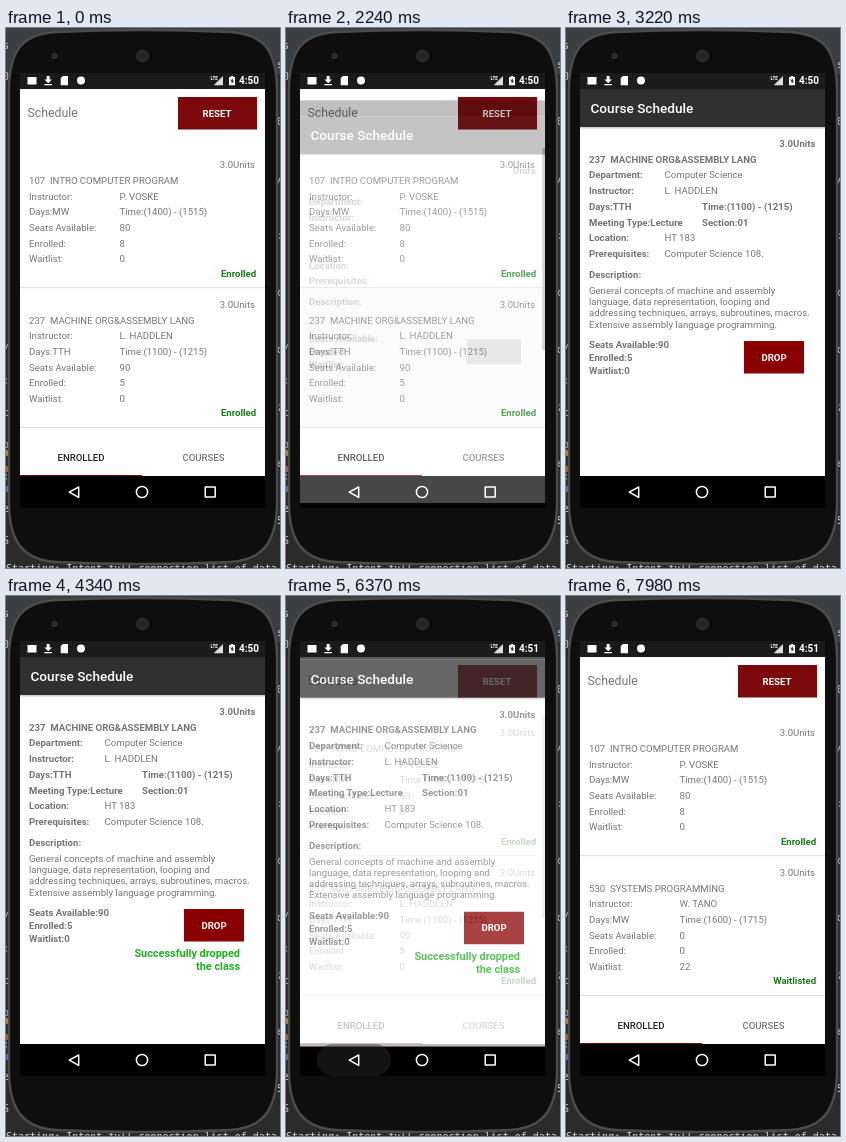
An HTML page that plays this animation: 274x540 px, repeating every 8.19 s.

```html
<!DOCTYPE html>
<html lang="en">
<head>
<meta charset="utf-8">
<title>Course schedule</title>
<style>
  html, body { margin: 0; width: 100%; height: 100%; overflow: hidden; background: #2b2b2b; }
  svg { display: block; width: 274px; height: 540px; }
  text { font: 9.6px Roboto, sans-serif; fill: #757575; white-space: pre; }
  .bold { font-weight: 700; }
  .medium { font-weight: 500; }
  .end { text-anchor: end; }
  .mid { text-anchor: middle; }
  .white { fill: #fff; }
  .dark { fill: #212121; }
  .green { fill: #1a7a1a; }
  .title { font-size: 13.6px; }
  .heading { font-size: 12.3px; }
  .notice { font-size: 10.9px; fill: #20ae20; }
  .code { font: 10px "DejaVu Sans Mono", monospace; fill: #d0d4d8; }
</style>
</head>
<body>
<svg id="stage" viewBox="0 0 274 540"></svg>
<script>
const LOOP = 8190, STEP = 70;

const text = (x, y, str, cls = '') =>
  `<text x="${x}" y="${y}" class="${cls}">${str.replace(/&/g, '&amp;')}</text>`;
const rect = (x, y, w, h, fill, more = '') =>
  `<rect x="${x}" y="${y}" width="${w}" height="${h}" fill="${fill}" ${more}/>`;

function courseRow(y, c) {
  const pairs = [['Instructor:', c.teacher], ['Days:' + c.days, 'Time:' + c.time],
    ['Seats Available:', c.seats], ['Enrolled:', c.enrolled], ['Waitlist:', c.waiting]];
  return text(249, y + 20.4, '3.0Units', 'end') + text(23, y + 36.2, c.name) +
    pairs.map(([a, b], i) => text(23, y + 51.8 + i * 15.6, a) + text(113.5, y + 51.8 + i * 15.6, b)).join('') +
    text(250.2, y + 128.6, c.status, 'end bold green');
}

const intro = { name: '107  INTRO COMPUTER PROGRAM', teacher: 'P. VOSKE', days: 'MW',
  time: '(1400) - (1515)', seats: '80', enrolled: '8', waiting: '0', status: 'Enrolled' };
const machine = { name: '237  MACHINE ORG&ASSEMBLY LANG', teacher: 'L. HADDLEN', days: 'TTH',
  time: '(1100) - (1215)', seats: '90', enrolled: '5', waiting: '0', status: 'Enrolled' };
const systems = { name: '530  SYSTEMS PROGRAMMING', teacher: 'W. TANO', days: 'MW',
  time: '(1600) - (1715)', seats: '0', enrolled: '0', waiting: '22', status: 'Waitlisted' };

// Code lines of the editor peek out on both sides of the phone.
const peeks = [...'s0/:co;eS'].map((ch, i) =>
  text(-3, i < 2 ? 21 + i * 31 : 260 + i * 32, ch, 'code') + text(271, 40 + i * 57, ch, 'code')).join('');

const backdrop = rect(0, 0, 274, 540, '#2b2b2b') + rect(0, 0, 274, 46, '#3c3f41') + peeks +
  '<circle cx="1" cy="425" r="3" fill="#b98a35"/><circle cx="1" cy="441" r="3" fill="#b0602f"/>' +
  '<circle cx="1" cy="461" r="3" fill="#5d6fae"/>' +
  text(0, 544, 'Starting: Intent full connection list of data', 'code');

const phone = `<path d="M3 60C4 20 18 6 50 4Q137 0 224 4C256 6 270 20 271 60V478
    C270 515 256 532 224 534Q137 538 50 534C18 532 4 515 3 478Z"
    fill="#0e0e0e" stroke="#4c4c4c" stroke-width="2.4"/>` +
  '<circle cx="136.5" cy="28" r="6" fill="#262626" stroke="#333"/>' +
  '<circle cx="48.5" cy="28" r="2.6" fill="#2a2a2a" stroke="#444" stroke-width=".8"/>';

const listPage = rect(14, 45, 245, 16, '#1a1a1a') + rect(14, 61, 245, 387, '#fff') +
  text(21.5, 89.3, 'Schedule', 'heading') +
  rect(172, 69, 79, 32.5, '#7b080b') + text(211, 88.8, 'RESET', 'mid bold white') +
  rect(14, 260, 245, 140, '#000', 'id="press" opacity="0"') +
  courseRow(120, intro) +
  `<g id="oldRow">${courseRow(259.6, machine)}</g><g id="newRow">${courseRow(259.6, systems)}</g>` +
  rect(14, 259.3, 245, .8, '#d6d6d6') + rect(14, 399, 245, .8, '#d6d6d6') +
  rect(256.3, 120, 2.7, 202, '#c2c2c2', 'id="scrollbar"') +
  text(75, 432.6, 'ENROLLED', 'mid medium dark') + text(197.5, 432.6, 'COURSES', 'mid medium') +
  rect(14, 447, 122, 1, '#7b080b') +
  `<g clip-path="url(#content)"><g id="spinner">
    <circle r="14.3" cy=".8" fill="#000" opacity=".14"/><circle r="13.6" fill="#fafafa"/>
    <circle id="arc" r="5.5" fill="none" stroke="#222" stroke-width="1.7"/></g></g>`;

const facts = [['Department:', 'Computer Science', 98.5, ''], ['Instructor:', machine.teacher, 98.5, ''],
  ['Days:TTH', 'Time:(1100) - (1215)', 136, 'bold'], ['Meeting Type:Lecture', 'Section:01', 136, 'bold'],
  ['Location:', 'HT 183', 98.5, ''], ['Prerequisites:', 'Computer Science 108.', 98.5, '']];
const about = ['General concepts of machine and assembly', 'language, data representation, looping and',
  'addressing techniques, arrays, subroutines, macros.', 'Extensive assembly language programming.'];
const totals = [['Seats Available:', '90'], ['Enrolled:', '5'], ['Waitlist:', '0']];

const factLine = i => 150.2 + i * 15.8;
const totalLines = (y, filled) =>
  totals.map(([label, n], i) => text(23, y + i * 13, label + (filled ? n : ''), 'bold')).join('');

const emptyDetail = text(249.5, 118.8, 'Units', 'end bold') +
  facts.map(([a], i) => a.endsWith(':') ? text(23, factLine(i), a, 'bold') : '').join('') +
  totalLines(286.5, false) + rect(181, 284, 54, 25, '#bcbcbc');

const filledDetail = text(249.5, 118.8, '3.0Units', 'end bold') + text(23, 134.6, machine.name, 'bold') +
  facts.map(([a, b, x, cls], i) => text(23, factLine(i), a, 'bold') + text(x, factLine(i), b, cls)).join('') +
  about.map((line, i) => text(23, 266 + i * 11.2, line)).join('') + totalLines(320, true) +
  rect(178, 313, 60, 32.5, '#8a0000') + rect(178, 313, 60, 32.5, '#fff', 'id="dropPress" opacity="0"') +
  text(208, 332.7, 'DROP', 'mid bold white') +
  `<g id="notice">${text(234, 361.3, 'Successfully dropped', 'end bold notice')}
    ${text(234, 374.2, 'the class', 'end bold notice')}</g>`;

const detailPage = rect(14, 45, 245, 16, '#1c1c1c') + rect(14, 99, 245, 349, '#fff') +
  rect(14, 99, 245, 1.5, '#000', 'opacity=".18"') + rect(14, 61, 245, 38, '#303030') +
  rect(14, 448, 245, 32, '#000') + text(24.5, 85, 'Course Schedule', 'title medium white') +
  text(23, 250, 'Description:', 'bold') +
  `<g id="empty">${emptyDetail}</g><g id="filled">${filledDetail}</g>`;

const statusIcons = rect(21.5, 49, 9, 7.5, '#fff') +
  '<path d="M40.7 48h3v3.5h2.3L42.2 55.3 38.4 51.5h2.3zM38.4 56h7.6v1.2h-7.6z" fill="#fff"/>' +
  '<path d="M57 48h5v9.3h-7.3V50.3z" fill="#fff"/>' +
  '<circle cx="75" cy="52.6" r="4" fill="#fff"/>' +
  '<path d="M217 48v9.3h-9.3z" fill="#ddd"/>' +
  '<text x="204.5" y="52" class="bold white" style="font-size:4.6px">LTE</text>' +
  '<path d="M223 49h1.8v-1h2.4v1H229v8.3h-6z" fill="#fff"/>' +
  '<path d="M226.6 50l-2.2 3.5h1.4v2.6l2.1-3.6h-1.3z" fill="#222"/>' +
  '<text id="clock" x="253" y="56.2" class="end bold white" style="font-size:10px"></text>';

const navIcons = '<g fill="none" stroke="#fff" stroke-width="1.5" stroke-linejoin="round">' +
  '<path d="M72.7 459v10.4L63.2 464.2z"/><circle cx="136" cy="464" r="5.6"/>' +
  '<rect x="199.2" y="459" width="10" height="10"/></g>';

document.getElementById('stage').innerHTML =
  `<defs><clipPath id="screen">${rect(14, 45, 245, 435, '#000')}</clipPath>
   <clipPath id="content">${rect(14, 61, 245, 387, '#000')}</clipPath></defs>` +
  backdrop + phone + `<g clip-path="url(#screen)">` +
  rect(14, 45, 245, 435, '#000') + listPage + `<g id="detail">${detailPage}</g>` +
  rect(31, 448, 74, 32, '#2c2c2c', 'id="navPress" rx="16"') + statusIcons + navIcons + '</g>';

const el = Object.fromEntries([...document.querySelectorAll('svg [id]')].map(n => [n.id, n]));
const set = (node, attrs) => Object.entries(attrs).forEach(([k, v]) => node.setAttribute(k, v));
const ramp = (t, a, b) => Math.min(1, Math.max(0, (t - a) / (b - a)));
const easeOut = p => 1 - (1 - p) ** 3;
const show = (node, on) => set(node, { opacity: on ? 1 : 0 });
// Rises from a to b, then falls from c to d.
const pulse = (t, a, b, c, d) => ramp(t, a, b) * (1 - ramp(t, c, d));

function drawSpinner(t) {
  const start = t < 4000 ? 1050 : 7210, u = t - start;
  const y = 47 + 66 * easeOut(ramp(u, -50, 280)) - 22 * easeOut(ramp(u, 280, 460));
  const sweep = u < 280 ? 26 * ramp(u, 0, 280) : 15 + 10 * Math.cos((u - 280) / 110);
  show(el.spinner, u >= 0 && u < 770);
  set(el.spinner, { transform: `translate(136.5 ${y}) scale(${1 - ramp(u, 620, 770)})` });
  set(el.arc, { transform: `rotate(${u * .6})`, 'stroke-dasharray': `${Math.max(0, sweep)} 40` });
}

function render(t) {
  const opened = t < 4000;
  const alpha = opened ? ramp(t, 2170, 2420) : 1 - ramp(t, 6330, 6480);
  const shift = opened ? 35 * (1 - ramp(t, 2215, 2530)) ** 3 : 35 * ramp(t, 6300, 6550) ** 2;
  set(el.detail, { opacity: alpha, transform: `translate(0 ${shift})` });
  const loaded = t >= 2380;
  show(el.empty, !loaded);
  show(el.filled, loaded);

  const refreshed = t >= 7840;
  show(el.oldRow, !refreshed);
  show(el.newRow, refreshed);
  set(el.scrollbar, { opacity: t < 1680 ? 0 : 1 - ramp(t, 6650, 6930) });
  set(el.press, { opacity: .09 * pulse(t, 1820, 1960, 2030, 2300) });
  set(el.dropPress, { opacity: .2 * pulse(t, 3710, 3800, 3840, 3920) });
  show(el.notice, t >= 4130);
  el.clock.textContent = t < 5110 ? '4:50' : '4:51';

  const width = 74 * easeOut(ramp(t, 5740, 6160));
  set(el.navPress, { x: 68 - width / 2, width, opacity: pulse(t, 5740, 5950, 6280, 6440) });
  drawSpinner(t);
}

const origin = performance.now();
function tick() {
  const t = (performance.now() - origin) % LOOP;
  render(Math.floor(t / STEP) * STEP);
  requestAnimationFrame(tick);
}
tick();
</script>
</body>
</html>
```
